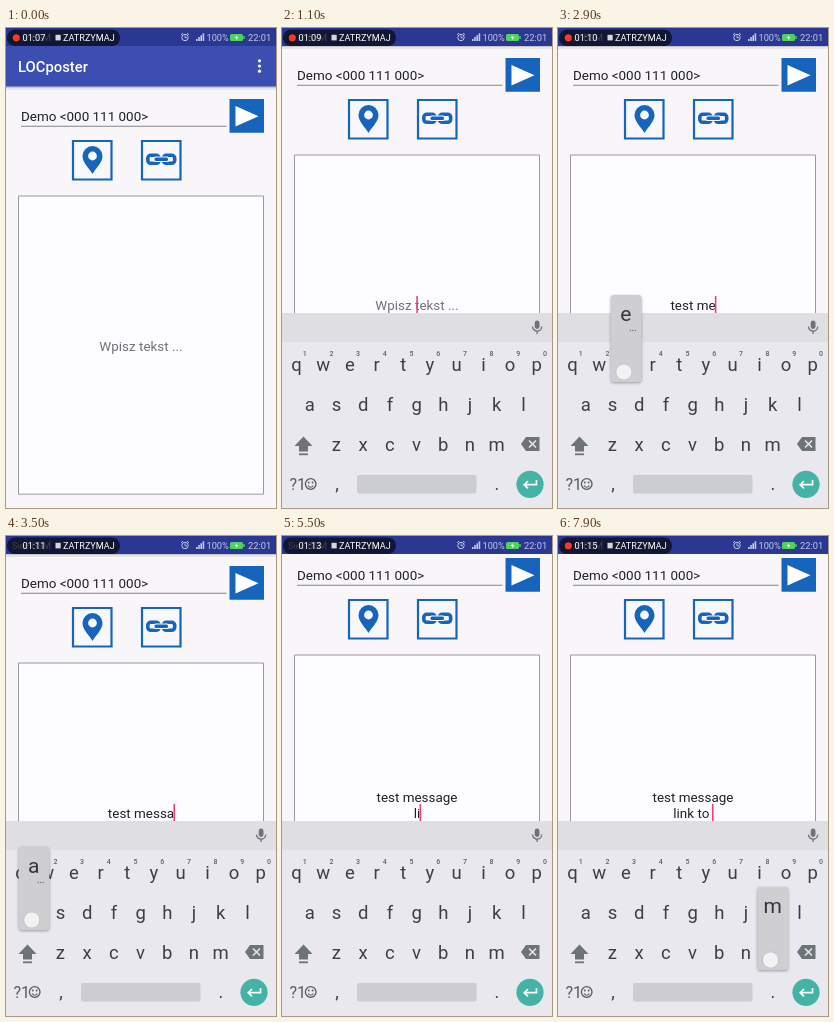
Write an HTML page with a canvas that moves like this. It is 270x480 px and loops after 8000 ms.

```html
<!DOCTYPE html>
<html lang="pl">
<head>
<meta charset="utf-8">
<style>
  html, body { margin: 0; width: 100%; height: 100%; overflow: hidden; background: #f8f6f9; }
  canvas { display: block; width: 100vw; height: 100vh; }
</style>
</head>
<body>
<canvas id="stage"></canvas>
<script>
const canvas = document.getElementById('stage');
const ctx = canvas.getContext('2d');
const LOOP = 8000;
const BLUE = '#1764bd', INK = '#3b3f47', ICON = '#6e7379', KEYBOARD = '#e9e8ef';
const BODY = 13.45;

// Moments at which each key is entered.
const presses = [
  [1330, 't'], [1640, 'e'], [1960, 's'], [2260, 't'], [2480, ' '], [2680, 'm'],
  [2860, 'e'], [3080, 's'], [3290, 's'], [3480, 'a'], [3690, 'g'], [3890, 'e'],
  [4150, '\n'], [4980, 'l'], [5380, 'i'], [5720, 'n'], [6060, 'k'], [6450, ' '],
  [6750, 't'], [7000, 'o'], [7300, ' '], [7980, 'm']
];

const keys = {};
[['qwertyuiop', 14.5, 337], ['asdfghjkl', 27.8, 377], ['zxcvbnm', 54.4, 417]].forEach(
  ([letters, x, y]) => [...letters].forEach((c, i) => keys[c] = { x: x + i * 26.7, y }));

const easeOut = (t, start, length) => {
  const p = Math.min(1, Math.max(0, (t - start) / length));
  return 1 - (1 - p) ** 2;
};

function rect(x, y, w, h, color, radius = 0) {
  ctx.fillStyle = color;
  ctx.beginPath();
  ctx.roundRect(x, y, w, h, radius);
  ctx.fill();
}
function frame(x, y, w, h, color, width, radius = 0) {
  ctx.strokeStyle = color;
  ctx.lineWidth = width;
  ctx.beginPath();
  ctx.roundRect(x, y, w, h, radius);
  ctx.stroke();
}
function disc(x, y, r, color) {
  ctx.fillStyle = color;
  ctx.beginPath();
  ctx.arc(x, y, r, 0, 7);
  ctx.fill();
}
function ring(x, y, r, color, width) {
  ctx.strokeStyle = color;
  ctx.lineWidth = width;
  ctx.beginPath();
  ctx.arc(x, y, r, 0, 7);
  ctx.stroke();
}
function shape(path, color) {
  ctx.fillStyle = color;
  ctx.fill(new Path2D(path));
}
function line(path, color, width) {
  ctx.strokeStyle = color;
  ctx.lineWidth = width;
  ctx.stroke(new Path2D(path));
}
function text(str, x, y, size, color, align = 'left', weight = 400) {
  ctx.font = `${weight} ${size}px Roboto, sans-serif`;
  ctx.textAlign = align;
  ctx.fillStyle = color;
  ctx.fillText(str, x, y);
}
function touch(x, y) {
  disc(x, y, 8, 'rgba(255,255,255,.72)');
  ring(x, y, 8, 'rgba(110,110,115,.22)', 1);
}

function drawToolbar() {
  rect(0, 58, 270, 2, 'rgba(0,0,0,.2)');
  rect(0, 60, 270, 2, 'rgba(0,0,0,.07)');
  rect(0, 0, 270, 58.5, '#3d4eb2');
  text('LOCposter', 12, 43.6, 14.8, '#fff', 'left', 500);
  for (const y of [32.8, 38, 43.2]) disc(253.5, y, 1.6, '#fff');
}

function drawForm() {
  text('Demo <000 111 000>', 15, 93.2, BODY, '#222');
  rect(15, 97.7, 205.5, 1, '#858388');

  rect(223.5, 71, 34.5, 33.7, BLUE);
  shape('M229.5 78V98.5L252.5 88.2Z', '#fff');

  for (const x of [67, 136]) {
    rect(x, 113, 38.5, 38.5, '#f8f8fc');
    frame(x, 113, 38.5, 38.5, BLUE, 2.2);
  }
  shape('M86.5 146C83 140 76.5 134.5 76.5 128A10 10 0 0 1 96.5 128C96.5 134.5 90 140 86.5 146Z', BLUE);
  disc(86.5, 128, 4.4, '#f8f8fc');

  frame(141.8, 127.3, 11.4, 8, BLUE, 3.6, 3);
  frame(157.3, 127.3, 11.4, 8, BLUE, 3.6, 3);
  rect(147.5, 128.6, 15.5, 5.4, '#f8f8fc', 2);
  rect(148.5, 129.5, 13.5, 3.6, BLUE, 1.5);

  rect(12, 168, 246, 298.5, '#fdfcfe');
  frame(12.5, 168, 245, 298.2, '#9a989c', 1);
}

function drawMessage(t) {
  const done = presses.filter(p => p[0] <= t);
  const lines = done.map(p => p[1]).join('').split('\n');
  const top = 323 - (lines.length - 1) * 8;

  if (!done.length) text('Wpisz tekst ...', 135, 323.2, BODY, '#737176', 'center');
  let width = 0;
  lines.forEach((str, i) => {
    ctx.font = `400 ${BODY}px Roboto, sans-serif`;
    width = ctx.measureText(str).width;
    text(str, 135 - width / 2, top + i * 16, BODY, '#222');
  });

  const since = t - (done.length ? done[done.length - 1][0] : 850);
  if (since >= 0 && since % 1240 < 620)
    rect(134.3 + width / 2, top + (lines.length - 1) * 16 - 14, 1.6, 17, '#f0407c');
}

function drawKeyboard() {
  rect(0, 285, 270, 195, KEYBOARD);
  rect(0, 285, 270, 29, '#dfdee3');

  rect(252.7, 292.5, 4.8, 8.5, ICON, 2.4);
  line('M250.5 298.5A4.6 4.6 0 0 0 259.7 298.5M255.1 303V306', ICON, 1.3);

  for (const [c, { x, y }] of Object.entries(keys)) text(c, x, y + 6, 18.5, INK, 'center');
  [...'1234567890'].forEach((n, i) => text(n, 22.7 + i * 26.7, 327.5, 7, '#5c6067', 'center', 500));

  shape('M21.5 408.5L30.5 418H26V423.5H17V418H12.5Z', ICON);
  rect(17, 425.4, 9, 1.8, ICON);
  shape('M239 416L244 409H257.5V423H244Z', ICON);
  line('M247 412.5L254 419.5M254 412.5L247 419.5', KEYBOARD, 1.5);

  text('?1', 7.5, 462, 16, '#555a62');
  ring(28.7, 456, 5.3, '#555a62', 1.3);
  disc(26.8, 454.5, .9, '#555a62');
  disc(30.6, 454.5, .9, '#555a62');
  line('M26 457.5Q28.7 461 31.4 457.5', '#555a62', 1.2);
  text(',', 55, 462, 18, INK, 'center');
  text('.', 214.8, 462, 18, INK, 'center');
  rect(75, 447, 119.5, 18.5, '#cccdd2', 2);

  disc(248, 456.3, 13.6, '#45b2a6');
  line('M254.5 452V456.7H242.5M246 453L242.2 456.7L246 460.4', '#fff', 1.7);
}

function drawPress(c) {
  if (c === ' ') return touch(101, 469);
  if (c === '\n') return touch(255, 461);
  const { x, y } = keys[c];
  const lift = y === 337 ? 4 : 0;
  ctx.shadowColor = 'rgba(0,0,0,.35)';
  ctx.shadowBlur = 3;
  ctx.shadowOffsetY = 1;
  rect(x - 15, y - 66 - lift, 30.5, 83 + lift, '#cfcfd2', 3);
  ctx.shadowColor = 'transparent';
  text(c, x, y - 40 - lift, 21, '#33373e', 'center');
  if (!'mk'.includes(c))
    for (const dx of [4.5, 7, 9.5]) disc(x + dx, y - 30.5 - lift, .7, '#74777c');
  touch(x - 2, y + 7);
}

function drawStatus(t) {
  rect(0, 0, 270, 18, '#2b3893');
  text('Sieć GSM', 6, 13, 9, '#dde');
  rect(1, 1.5, 113, 16.5, 'rgba(10,12,24,.76)', 8);
  if ((t + 200) % 975 < 400) {
    rect(5, 5, 11, 10, '#12131c', 5);
    disc(10.3, 9.8, 3.6, '#f03a30');
  }
  const seconds = 7 + Math.floor((t + 900) / 1000);
  text('01:' + String(seconds).padStart(2, '0'), 16.5, 13, 9.2, '#fff');
  rect(43.5, 5, .8, 9, '#33364a');
  rect(49.5, 6.8, 5.2, 5.6, '#d8d8dc');
  text('ZATRZYMAJ', 57, 13, 9.1, '#fff');

  const pale = '#c6c9e2';
  ring(179, 9.5, 3.2, pale, 1);
  line('M179 7.5V9.8H181M175 6.8L177 5M183 6.8L181 5', pale, .9);
  for (let i = 0; i < 4; i++) rect(190 + i * 2.2, 11 - i * 1.9, 1.6, 2 + i * 1.9, pale);
  text('100%', 200.5, 13, 9.2, pale);
  rect(224, 6, 13, 7, '#4fd35b', 1.5);
  rect(237.3, 8, 1.4, 3, '#4fd35b');
  shape('M231 7L228.8 10H230.3L229.8 12.3L232.6 9.2H230.6Z', '#fff');
  text('22:01', 242, 13, 9.3, pale);
}

function draw(t) {
  rect(0, 0, 270, 480, '#f8f6f9');
  ctx.save();
  ctx.translate(0, -41 * easeOut(t, 655, 280) - 8 * easeOut(t, 4150, 250));
  drawToolbar();
  drawForm();
  drawMessage(t);
  ctx.restore();

  if (t > 480 && t < 760) touch(151, 314);
  if (t > 730) {
    ctx.save();
    ctx.translate(0, 195 * (1 - easeOut(t, 730, 170)));
    drawKeyboard();
    ctx.restore();
  }
  const active = presses.find(([at]) => t >= at - 120 && t < at + 60);
  if (active) drawPress(active[1]);
  drawStatus(t);
}

function tick(now) {
  const scale = window.devicePixelRatio || 1;
  const w = Math.round(innerWidth * scale), h = Math.round(innerHeight * scale);
  if (canvas.width !== w || canvas.height !== h) {
    canvas.width = w;
    canvas.height = h;
  }
  ctx.setTransform(w / 270, 0, 0, h / 480, 0, 0);
  draw(now % LOOP);
  requestAnimationFrame(tick);
}
requestAnimationFrame(tick);
</script>
</body>
</html>
```
